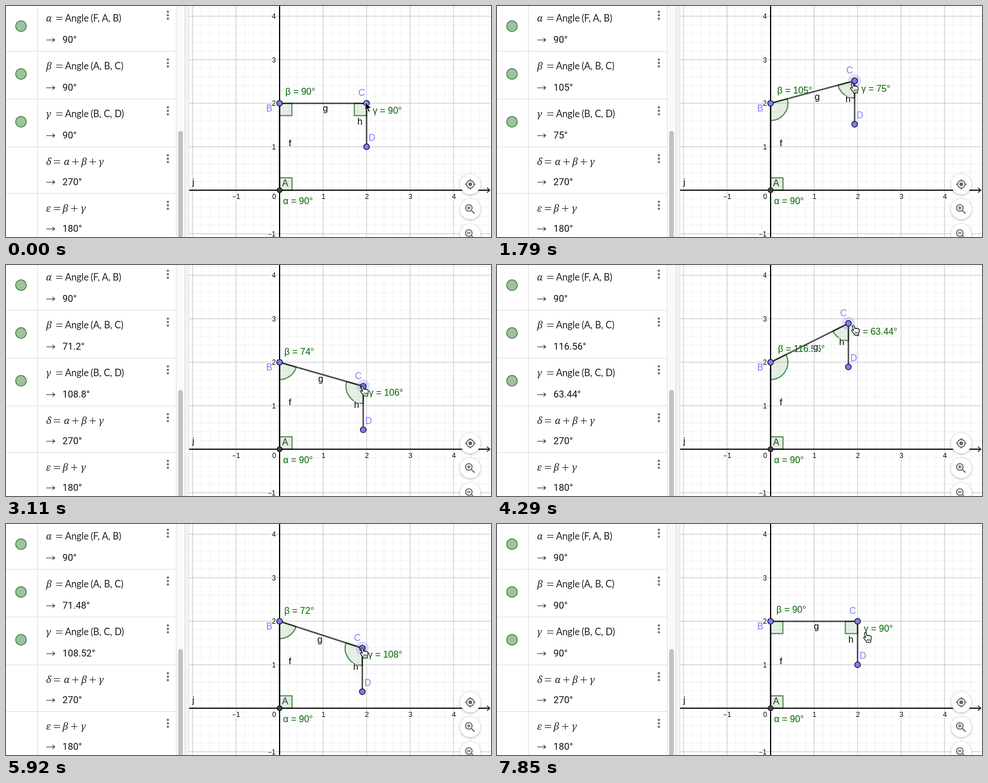
Animation, 842 px wide and 401 px high, one loop 7990 ms. Source, as an HTML page:

```html
<!DOCTYPE html>
<html lang="en">
<head>
<meta charset="utf-8">
<style>
  html, body { margin: 0; width: 100%; height: 100%; overflow: hidden; background: #fff; }
  svg { display: block; width: 842px; height: 401px; }
  text { font-family: "Liberation Sans", Arial, sans-serif; font-size: 16px; }
  .fn { font-family: Lato, sans-serif; font-size: 16.3px; fill: #1c1c1c; }
  .greek { font-family: "Noto Serif", "DejaVu Serif", serif; font-style: italic; font-size: 16.5px; fill: #222; }
  .value { font-family: Roboto, sans-serif; font-size: 16.5px; fill: #111; }
  .tick { font-size: 12px; text-anchor: middle; }
  .angle { fill: #006400; fill-opacity: .1; stroke: #006400; stroke-opacity: .7; stroke-width: 2; }
  .green { fill: #006400; }
  .blue { fill: #7d7dff; text-anchor: middle; }
  .tick, .name { paint-order: stroke; stroke: #fff; stroke-width: 3px; stroke-linejoin: round; }
  .name { text-anchor: middle; }
  .seg { stroke: #000; stroke-opacity: .7; stroke-width: 2.5; }
  .point { fill: #7d7dff; stroke: #000; stroke-width: 1.2; }
  .icon { fill: none; stroke: #666; stroke-width: 1.8; }
</style>
</head>
<body>
<svg id="stage" viewBox="0 0 842 401">
  <defs>
    <filter id="shadow" x="-30%" y="-30%" width="160%" height="160%">
      <feDropShadow dx="0" dy="1" stdDeviation="2" flood-color="#000" flood-opacity=".35"/>
    </filter>
    <clipPath id="plotArea"><path d="M318 0H841V401H318z"/></clipPath>
  </defs>
  <g id="panel"></g>
  <g id="plot" clip-path="url(#plotArea)">
    <g id="grid"></g>
    <path class="angle" d="M475 298.3H496.5V319.8H475z"/>
    <path class="angle" id="angleB"/>
    <path class="angle" id="angleC"/>
    <path d="M318 319.8H838M475 0V401" stroke="#000" stroke-width="2"/>
    <path d="M835 315.5L840 319.8L835 324" fill="none" stroke="#000" stroke-width="1.4"/>
    <g id="ticks"></g>
    <line class="seg" x1="475" y1="168.9" x2="475" y2="319.8"/>
    <line class="seg" id="segG"/>
    <line class="seg" id="segH"/>
    <circle id="halo" r="11.5" fill="#7d7dff" fill-opacity=".25"/>
    <circle cx="475" cy="319.8" r="4.3" fill="#444" stroke="#000" stroke-width="1.2"/>
    <circle class="point" cx="475" cy="168.9" r="5"/>
    <circle class="point" id="ptC" r="5"/>
    <circle class="point" id="ptD" r="5"/>
    <text class="green" x="481" y="343.5">α = 90°</text>
    <text class="green" id="labelBeta"></text>
    <text class="green" id="labelGamma"></text>
    <text x="484.5" y="312.7" text-anchor="middle" fill="#333">A</text>
    <text class="blue" x="457" y="182.5">B</text>
    <text class="blue" id="nameC">C</text>
    <text class="blue" id="nameD">D</text>
    <text class="name" x="493" y="244">f</text>
    <text class="name" x="325" y="310.5">j</text>
    <text class="name" id="nameG">g</text>
    <text class="name" id="nameH">h</text>
  </g>
  <g id="buttons"></g>
  <path id="arrow" d="M0 0V15.2l3.5-3.3 2.3 5.5 2.5-1.1-2.3-5.3h4.9z" stroke="#fff" stroke-width="1"/>
  <g id="hand">
    <path d="M-5-7.3c0-2.1 3-2.1 3.2 0l.9 4.3c.5-1.2 2.3-1 2.6.2 .6-1 2.2-.7 2.5.5 .7-.8 2.3-.4 2.5 1 .4 2.8.3 4.2-.6 6.2l-.3 3.6h-7l-.8-2c-1.3-1.4-2.6-3.4-4-5.2-1.2-1.8.6-3 2-1.8l1 1z"
      fill="#fff" stroke="#000" stroke-width="1.2" stroke-linejoin="round"/>
    <path d="M-.2 2.5V6M2 2.5V6M4.1 2.5V6" stroke="#000" stroke-width=".9"/>
  </g>
</svg>
<script>
const $ = id => document.getElementById(id);
const LOOP = 7990, UNIT = 75.5, OX = 475, OY = 319.8;
const B = { x: OX, y: 168.9 }, LENGTH = 2 * UNIT, RADIUS = 30, SQUARE = 21.3;

// Drag phases: start, end, then the tilt of BC in degrees at each even step.
const phases = [
  [900, 1940, [0, 6.22, 9.25, 12, 14, 15, 15, 14.8]],
  [2090, 3110, [2.5, -8.575, -18.2, -25, -30.6, -29, -23, -16]],
  [3260, 3700, [0, 15, 26.565, 26.565]],
  [4290, 5320, [26.565, 23.5, 16, 6, -3.865, -12.24, -19.3, -19.3]],
  [5920, 6800, [-18, -15.2, -12.11, -8.41, -4.5, 0, 0]]
];
// Pointer offset from C while dragging: time, dx, dy.
const grips = [
  [900, 0, 8], [1197, 0, 8], [2382, -1.5, 17], [2750, 0, 10], [3700, 5, 6],
  [4290, 12, 12], [5026, 3.5, 19], [5320, 2, 12], [6360, 3.5, 6], [6800, 1, 7]
];
const LAG = 0.4;

const steps = phases.flatMap(([from, to, tilts]) =>
  tilts.map((tilt, i) => ({ t: from + (to - from) * i / (tilts.length - 1), tilt })));

function drawPanel() {
  const line = d => `<path d="${d}" stroke="#dcdcdc" fill="none"/>`;
  let out = '<path d="M296 0H311V401H296z" fill="#fafafa"/><path d="M311 0H317V401H311z" fill="#f3f3f3"/>'
    + line('M54.5 0V401M295.5 0V401M310.5 0V401M317.5 0V401M0 78.5H295M0 161.5H295M0 244.5H295M0 325.5H295')
    + '<rect x="299" y="217" width="8" height="200" rx="4" fill="#c1c1c1"/>';
  const text = (cls, x, y, s, id = '') => `<text class="${cls}" x="${x}" y="${y}"${id && ` id="${id}"`}>${s}</text>`;
  const equals = (x, y) => `<path d="M${x} ${y - 1.5}h11M${x} ${y + 2.5}h11" stroke="#222"/>`;
  const plus = (x, y) => `<path d="M${x} ${y + .5}h11M${x + 5.5} ${y - 5}v11" stroke="#222"/>`;
  const rows = [
    [21, 37, 'α', 'F, A, B', '90°', ''],
    [104, 37, 'β', 'A, B, C', '', 'valueBeta'],
    [187, 37, 'γ', 'B, C, D', '', 'valueGamma'],
    [270, 35, 'δ', '', '270°', ''],
    [351, 35, 'ε', '', '180°', '']
  ];
  for (const [y, gap, sym, args, value, id] of rows) {
    const v = y + gap;
    out += text('greek', 69.5, y + 5.5, sym) + equals(args ? 87 : 83, y);
    if (args) {
      out += text('fn', 102.5, y + 5.5, 'Angle') + text('fn', 147, y + 5.5, `(${args})`)
        + `<circle cx="26" cy="${y + 14}" r="9.3" fill="#a0c1a0" stroke="#2a7a2a" stroke-width="1.3"/>`;
    }
    out += `<path d="M70 ${v + 1}h15m-4-3.5q1.5 3 4 3.5q-2.500.5-4 3.500" fill="none" stroke="#222" stroke-width="1.1"/>`
      + text('value', 98, v + 6, value, id);
    for (const d of [-11, -5, 1]) out += `<circle cx="281" cy="${y + d}" r="2" fill="#707070"/>`;
  }
  out += text('greek', 100.5, 275.5, 'α') + plus(115, 270) + text('greek', 130.5, 275.5, 'β')
    + plus(145, 270) + text('greek', 161, 275.5, 'γ')
    + text('greek', 98, 356.5, 'β') + plus(113, 351) + text('greek', 130, 356.5, 'γ');
  $('panel').innerHTML = out;
}

function drawGrid() {
  let minor = '', major = '', ticks = '';
  for (let i = -11; i <= 24; i++) {
    const x = OX + i * UNIT / 5, y = OY - i * UNIT / 5;
    const d = `M${x} 0V401M318 ${y}H841`;
    if (i % 5) minor += d; else major += d;
  }
  const tick = (x, y, s) => `<text class="tick" x="${x}" y="${y}">${String(s).replace('-', '−')}</text>`;
  for (let n = -1; n <= 4; n++) {
    if (!n) continue;
    ticks += tick(OX + n * UNIT + (n < 0 ? 0 : .7), 335, n);
    ticks += tick(n < 0 ? 461 : 465, OY - n * UNIT + 4.5, n);
  }
  ticks += tick(465.500, 335, 0);
  $('grid').innerHTML = `<path d="${minor}" stroke="#f0f0f0"/><path d="${major}" stroke="#c0c0c0"/>`;
  $('ticks').innerHTML = ticks;
}

function drawButtons() {
  const disc = y => `<circle cx="806" cy="${y}" r="17.500" fill="#fff" filter="url(#shadow)"/>`;
  const lens = (y, bar) => `<circle cx="803.500" cy="${y - 2}" r="5.700"/><path d="M808 ${y + 2.5}l5.500 5.500M800.500 ${y - 2}h6${bar}"/>`;
  $('buttons').innerHTML = disc(309.5) + disc(352.5) + disc(396)
    + '<g class="icon"><circle cx="806" cy="309.500" r="6.500"/><path d="M806 300.500v3m0 12v3M797 309.500h3m12 0h3"/>'
    + lens(352.5, 'm-3-3v6') + lens(396, '') + '</g><circle cx="806" cy="309.500" r="3.300" fill="#666"/>';
}

function set(id, attrs) {
  for (const k in attrs) $(id).setAttribute(k, attrs[k]);
}
const move = (id, x, y) => set(id, { x, y });
const show = (id, on) => set(id, { visibility: on ? 'visible' : 'hidden' });
const degrees = v => +v.toFixed(2) + '°';

function poseAt(t) {
  let now = { t: 0, tilt: 0 }, prev = now;
  for (const s of steps) {
    if (s.t > t + 9) break;
    prev = now;
    now = s;
  }
  return { t: now.t, tilt: now.tilt, shown: now.tilt + (prev.tilt - now.tilt) * LAG };
}

function gripAt(t) {
  let i = 1;
  while (i < grips.length - 1 && grips[i][0] < t) i++;
  const a = grips[i - 1], b = grips[i];
  const k = Math.min(1, Math.max(0, (t - a[0]) / (b[0] - a[0])));
  return [a[1] + (b[1] - a[1]) * k, a[2] + (b[2] - a[2]) * k];
}

function sector(p, ax, ay, bx, by) {
  const r = RADIUS;
  return `M${p.x} ${p.y}l${ax * r} ${ay * r}A${r} ${r} 0 0 0 ${p.x + bx * r} ${p.y + by * r}z`;
}

function drawPointer(t, pose, C) {
  const dragging = t >= 900 && t < 7100;
  const arrow = t < 900 || (t >= 7100 && t < 7700);
  show('halo', dragging);
  show('arrow', arrow);
  show('hand', !arrow);
  let x = 643, y = 197;
  if (dragging) {
    const [dx, dy] = gripAt(pose.t);
    x = C.x + dx;
    y = C.y + dy;
  } else if (t < 7850) {
    x = 634;
    y = 184;
  }
  set('hand', { transform: `translate(${x} ${y})` });
  set('arrow', { transform: 'translate(623.5 166.5)' });
}

function render(t) {
  const pose = poseAt(t), a = pose.tilt * Math.PI / 180;
  const s = Math.sin(a), c = Math.cos(a);
  const C = { x: B.x + LENGTH * c, y: B.y - LENGTH * s };
  const D = { x: C.x, y: C.y + UNIT };
  const square = pose.tilt === 0, q = SQUARE;

  set('angleB', { d: square ? `M${B.x} ${B.y}h${q}v${q}h${-q}z` : sector(B, 0, 1, c, -s) });
  set('angleC', { d: square ? `M${C.x} ${C.y}h${-q}v${q}h${q}z` : sector(C, -c, s, 0, 1) });
  set('segG', { x1: B.x, y1: B.y, x2: C.x, y2: C.y });
  set('segH', { x1: C.x, y1: C.y, x2: D.x, y2: D.y });
  for (const id of ['halo', 'ptC']) set(id, { cx: C.x, cy: C.y });
  set('ptD', { cx: D.x, cy: D.y });

  move('nameC', C.x - 8.5, C.y - 12.5);
  move('nameD', D.x + 9.3, D.y - 10);
  move('nameG', (B.x + C.x) / 2 + 4 + 17 * s - 5 * s * s, (B.y + C.y) / 2 + 14.5 - 10 * s * s);
  move('nameH', C.x - 11.5, C.y + UNIT / 2 - .3);
  move('labelBeta', 485 + 6 * s, 154 - 6 * s);
  move('labelGamma', C.x + 10.8 + 3 * s, C.y + 17.8 + 5 * s);

  $('labelBeta').textContent = 'β = ' + degrees(90 + pose.tilt);
  $('labelGamma').textContent = 'γ = ' + degrees(90 - pose.tilt);
  $('valueBeta').textContent = degrees(90 + pose.shown);
  $('valueGamma').textContent = degrees(90 - pose.shown);
  drawPointer(t, pose, C);
}

drawPanel();
drawGrid();
drawButtons();
render(0);
const start = performance.now();
(function tick() {
  render((performance.now() - start) % LOOP);
  requestAnimationFrame(tick);
})();
</script>
</body>
</html>
```
